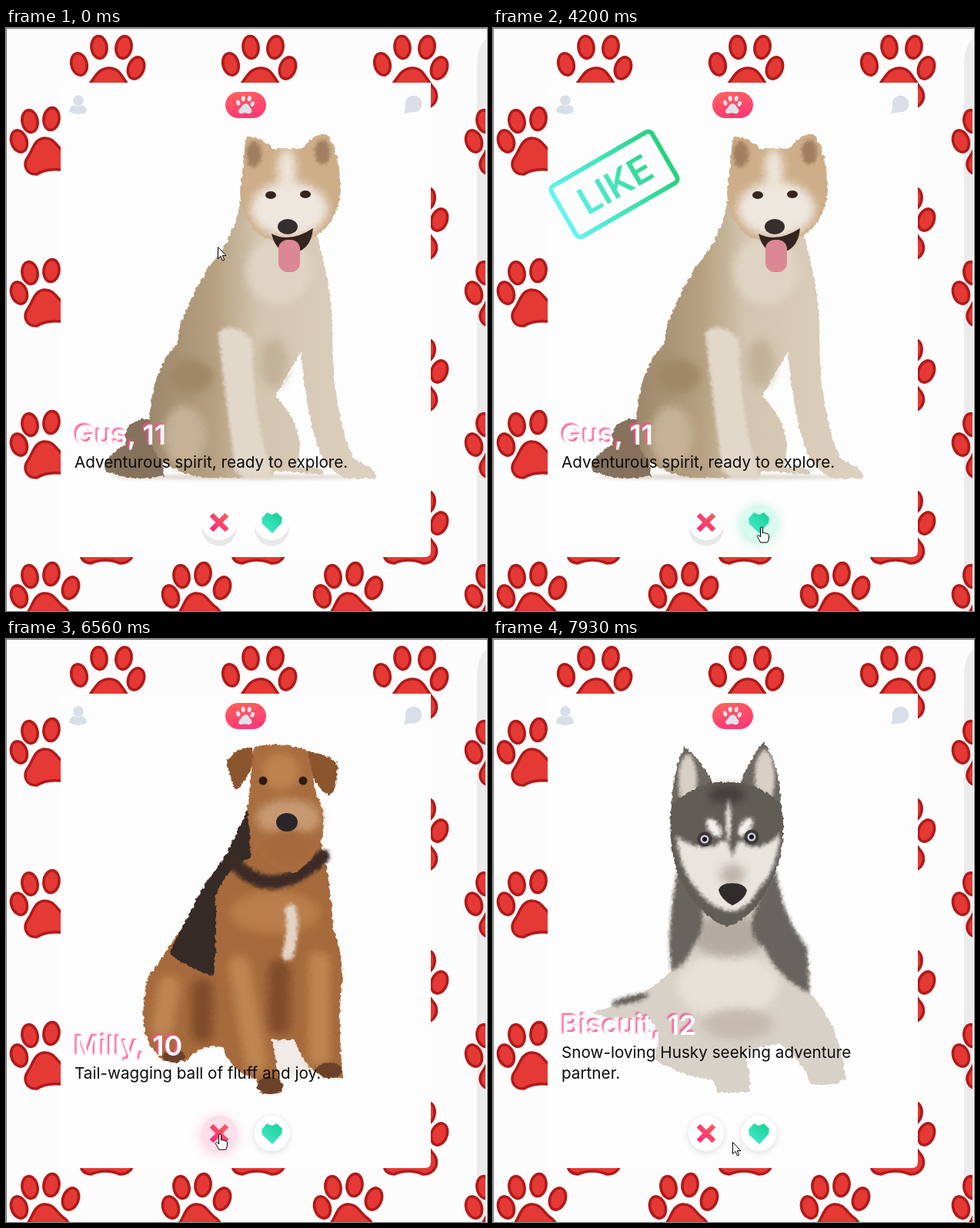
An HTML page that plays this animation: 625x757 px, repeating every 8000 ms.

```html
<!DOCTYPE html>
<html lang="en">
<head>
<meta charset="utf-8">
<title>Dog match</title>
<style>
html, body { margin: 0; width: 100%; height: 100%; overflow: hidden; background: #fcfcfc; }
svg { display: block; width: 625px; height: 757px; font-family: Inter, "Open Sans", sans-serif; }
.name { font-size: 36px; font-weight: 600; fill: #fff; filter: drop-shadow(-1.5px -1.5px 1px #fd4f8b); }
.bio { font-size: 20.7px; fill: #0c0c0c; }
.stamp { font-size: 48px; font-weight: 600; text-anchor: middle; }
.stamp rect { fill: none; stroke-width: 6px; }
.fur { filter: url(#fur); }
.soft { filter: blur(6px); }
.faint { filter: blur(2px); }
.limb { fill: none; stroke-linecap: round; }
.crescent { fill: #e8e8e8; }

/* Everything shares one clock; most cues are hard cuts */
.cue { animation: 8s step-end infinite; }
#first { animation-name: first; }
#second { animation-name: second; }
#third { animation-name: third; }
#like { animation-name: like; }
#nope { animation-name: nope; }
#hand { animation-name: hand; }
#arrow { animation-name: arrow; }
#yes .disc { animation-name: yes; }
#no .disc { animation-name: no; }
#yes .crescent { animation-name: yesRest; }
#no .crescent { animation-name: noRest; }
#cursor { animation: glide 8s infinite; }

@keyframes first { 0% { opacity: 1 } 57.1%, to { opacity: 0 } }
@keyframes second { 0%, 94.1%, to { opacity: 0 } 57.1% { opacity: 1 } }
@keyframes third { 0% { opacity: 0 } 94.1%, to { opacity: 1 } }
@keyframes like { 0%, 57.1%, to { opacity: 0 } 43.2% { opacity: 1 } }
@keyframes nope { 0%, 94.1%, to { opacity: 0 } 86.9% { opacity: 1 } }
@keyframes hand { 0%, 62.3%, 72.1%, 95.6%, to { opacity: 0 } 22.6%, 66.8%, 79% { opacity: 1 } }
@keyframes arrow { 0%, 62.3%, 72.1%, 95.6%, to { opacity: 1 } 22.6%, 66.8%, 79% { opacity: 0 } }
@keyframes yesRest { 0% { opacity: 1 } 22.6%, to { opacity: 0 } }
@keyframes noRest { 0% { opacity: 1 } 66.8%, to { opacity: 0 } }
@keyframes yes {
  0% { fill: #fdfdfd; filter: none }
  22.6% { fill: #d9faee; filter: drop-shadow(0 3px 8px #4be0b577) }
  62.3%, to { fill: #fff; filter: drop-shadow(0 2px 4px #0002) }
}
@keyframes no {
  0% { fill: #fdfdfd; filter: none }
  66.8%, 79% { fill: #fcdfe8; filter: drop-shadow(0 3px 8px #fd5c9255) }
  72.1%, 95.6%, to { fill: #fff; filter: drop-shadow(0 2px 4px #0002) }
}
@keyframes glide {
  0% { transform: translate(275px, 284px); animation-timing-function: steps(2) }
  3.1% { transform: translate(272px, 284px); animation-timing-function: steps(2) }
  6.3% { transform: translate(605px, 650px); animation-timing-function: steps(2) }
  9.4% { transform: translate(495px, 523px); animation-timing-function: steps(5) }
  17.3%, 19.6% { transform: translate(361px, 601px); animation-timing-function: steps(5) }
  27.1%, 49.4% { transform: translate(349px, 636px); animation-timing-function: steps(2) }
  52.4%, 55.2% { transform: translate(349px, 648px); animation-timing-function: steps(2) }
  58.9%, 60.8% { transform: translate(340px, 643px); animation-timing-function: steps(3) }
  65.3% { transform: translate(300px, 652px); animation-timing-function: steps(3) }
  70.2% { transform: translate(292px, 648px); animation-timing-function: steps(1) }
  72.1%, 77.4% { transform: translate(252px, 640px); animation-timing-function: steps(3) }
  81.9%, 87.3% { transform: translate(278px, 643px); animation-timing-function: steps(3) }
  92.2% { transform: translate(278px, 651px); animation-timing-function: steps(2) }
  95.6% { transform: translate(290px, 665px); animation-timing-function: steps(2) }
  99.1%, to { transform: translate(311px, 653px) }
}
</style>
</head>
<body>
<svg viewBox="0 0 625 757">
  <defs>
    <linearGradient id="pink" x1="0" y1="1" x2="1" y2="0"><stop stop-color="#fd297b"/><stop offset="1" stop-color="#f75c5c"/></linearGradient>
    <linearGradient id="pill" x2="0.3" y2="1"><stop stop-color="#ff655b"/><stop offset="1" stop-color="#fd3a74"/></linearGradient>
    <linearGradient id="mint" x1="0" y1="1" x2="1" y2="0"><stop stop-color="#4bebd0"/><stop offset="1" stop-color="#16cf92"/></linearGradient>
    <linearGradient id="likeInk" gradientUnits="userSpaceOnUse" x1="-78" x2="78"><stop stop-color="#64f4f1"/><stop offset="1" stop-color="#24d07c"/></linearGradient>
    <linearGradient id="nopeInk" gradientUnits="userSpaceOnUse" x1="-78" x2="78"><stop stop-color="#fd297b"/><stop offset="1" stop-color="#ff655b"/></linearGradient>
    <linearGradient id="cream"><stop stop-color="#9d886b"/><stop offset=".3" stop-color="#b8a283"/><stop offset=".48" stop-color="#d3c5af"/><stop offset="1" stop-color="#ddd1c0"/></linearGradient>
    <filter id="fur" x="-5%" y="-5%" width="110%" height="110%">
      <feTurbulence type="fractalNoise" baseFrequency=".2" numOctaves="2" seed="4"/>
      <feDisplacementMap in="SourceGraphic" scale="5" xChannelSelector="R" yChannelSelector="G"/>
    </filter>
    <ellipse id="toe" rx="10" ry="14.500"/>
    <g id="paw">
      <use href="#toe" transform="translate(95 47) rotate(-14)"/>
      <use href="#toe" transform="translate(121 25) rotate(-6)"/>
      <use href="#toe" transform="translate(153 25) rotate(10)"/>
      <use href="#toe" transform="translate(169 52) rotate(20)"/>
      <path d="M133 52C148 51 151 65 160 76C172 88 163 105 148 104Q129 96 110 104C93 102 95 86 104 78C114 69 117 53 133 52Z"/>
    </g>
    <g id="tiltedPaw">
      <use href="#toe" transform="translate(17 147) rotate(-18)"/>
      <use href="#toe" transform="translate(31 121) rotate(-10)"/>
      <use href="#toe" transform="translate(59 118) rotate(7)"/>
      <use href="#toe" transform="translate(84 136) rotate(20)"/>
      <path d="M49 143C61 142 65 152 73 159C87 168 86 183 71 184Q52 182 40 190C25 190 22 177 28 168C35 159 36 145 49 143Z"/>
    </g>
    <pattern id="paws" width="197" height="197" patternUnits="userSpaceOnUse">
      <g fill="#e53935" stroke="#b11a1a" stroke-width="3.600"><use href="#paw"/><use href="#tiltedPaw"/></g>
    </pattern>
  </defs>

  <rect width="625" height="757" fill="#fcfcfc"/>
  <path d="M624 14Q612 24 612 48V757H624Z" fill="#ebebeb"/>
  <rect width="623" height="757" fill="url(#paws)"/>
  <path d="M0 .5H625M.5 0V757" stroke="#777" fill="none"/>
  <path d="M71 71H552V679Q552 687 544 687H71Z" fill="#fdfdfd"/>

  <g fill="#d9dfe8">
    <circle cx="94" cy="94" r="6.800"/>
    <path d="M82 109Q82 101 90 100Q94 103 98 100Q105 101 105 109Q100 112 94 112T82 109Z"/>
    <circle cx="529.500" cy="98.500" r="10.800"/>
    <path d="M520 101L517 111L530 109Z"/>
  </g>
  <rect x="285" y="83" width="53" height="34" rx="17" fill="url(#pill)"/>
  <use href="#paw" transform="translate(278 85.300) scale(.25)" fill="#dfe3ec"/>

  <!-- cream dog -->
  <g id="first" class="cue">
    <ellipse cx="300" cy="583" rx="165" ry="3" fill="#d9d2c8" class="faint"/>
    <g class="fur">
      <path fill="#85715b" d="M200 508Q150 503 155 540Q120 565 130 575Q160 590 205 582Z"/>
      <path fill="url(#cream)" d="M306 215Q300 270 262 312Q225 375 222 410Q185 450 187 520Q185 575 262 584H345L350 575L412 580L410 572L378 570Q392 520 350 478L383 420Q395 545 420 570L440 585H480Q483 572 452 560Q425 500 424 400Q425 340 402 262Z"/>
      <ellipse class="soft" fill="#a08767" cx="240" cy="452" rx="30" ry="22"/>
      <ellipse class="soft" fill="#c4b196" cx="232" cy="530" rx="28" ry="40"/>
      <ellipse class="soft" fill="#c3b299" cx="348" cy="435" rx="18" ry="32"/>
      <ellipse class="soft" fill="#dfd4c3" cx="355" cy="315" rx="42" ry="45"/>
      <path class="faint" fill="#e2d8ca" d="M276 395Q285 480 298 575L310 585H348Q322 520 320 405Q295 378 276 395Z"/>
      <path fill="#cdae89" d="M304 214L312 141Q330 140 347 157H384Q400 138 415 137Q432 150 435 212Q430 255 400 272Q365 285 335 272Q306 255 304 214Z"/>
      <ellipse class="soft" fill="#eee7df" cx="368" cy="235" rx="50" ry="36"/>
      <ellipse class="soft" fill="#eee5da" cx="365" cy="184" rx="12" ry="28"/>
      <g class="faint" fill="#967355" opacity=".8">
        <ellipse cx="322" cy="164" rx="10" ry="17"/>
        <ellipse cx="411" cy="161" rx="10" ry="16"/>
      </g>
    </g>
    <path fill="#33241f" d="M345 267Q368 280 399 260Q396 292 368 292Q350 290 345 267Z"/>
    <rect x="354" y="275" width="28" height="42" rx="12" fill="#dc8794"/>
    <ellipse cx="366" cy="258" rx="13" ry="10" fill="#342e2c"/>
    <g fill="#35261d"><ellipse cx="344" cy="217" rx="7" ry="5"/><ellipse cx="389" cy="216" rx="7" ry="5"/></g>
    <text class="name" x="89" y="541">Gus, 11</text>
    <text class="bio" x="89" y="571">Adventurous spirit, ready to explore.</text>
  </g>

  <!-- tan and black dog -->
  <g id="second" class="cue">
    <ellipse cx="362" cy="540" rx="55" ry="30" fill="#f1ebe7" class="soft"/>
    <g class="fur">
      <path fill="#a66a3c" d="M314 215Q295 285 262 318Q225 385 185 438Q165 520 206 548H235Q250 525 282 530Q290 560 325 572L330 590H358Q352 550 345 520H375Q385 555 415 570H438Q430 500 437 440Q436 400 425 375Q422 310 408 260Z"/>
      <path fill="#352a28" d="M314 220Q285 290 258 318L212 408Q240 430 270 437Q275 370 272 335Q290 290 318 285Z"/>
      <ellipse class="soft" fill="#b97e4b" cx="350" cy="355" rx="58" ry="28"/>
      <g class="limb soft">
        <path stroke="#7f4c2b" stroke-width="28" d="M255 455V510M355 430V500"/>
        <path stroke="#bd8652" stroke-width="28" d="M303 425L325 550M407 420V540M212 450L203 505"/>
      </g>
      <path class="limb faint" stroke="#3c2c26" stroke-width="18" d="M296 290Q345 345 412 282"/>
      <path class="limb faint" stroke="#e4d3c5" stroke-width="15" d="M370 352Q375 380 366 410"/>
      <path fill="#8b552f" d="M320 141Q300 140 287 158Q292 190 300 196Q315 180 322 160Z"/>
      <path fill="#8b552f" d="M387 146Q410 146 430 160Q432 195 420 204Q400 190 394 165Z"/>
      <path fill="#a96d3f" d="M322 140Q355 132 392 145L404 205Q418 225 410 262Q395 295 372 304Q335 300 318 262Q312 220 318 180Z"/>
      <ellipse class="soft" fill="#c79a72" cx="367" cy="232" rx="42" ry="24"/>
      <ellipse class="soft" fill="#a4693c" cx="366" cy="268" rx="28" ry="22"/>
      <ellipse class="soft" fill="#bd8350" cx="357" cy="172" rx="24" ry="24"/>
      <g fill="#6b4229"><ellipse cx="218" cy="542" rx="14" ry="8"/><ellipse cx="343" cy="580" rx="17" ry="11"/><ellipse cx="420" cy="560" rx="17" ry="10"/></g>
    </g>
    <ellipse cx="365" cy="238" rx="14" ry="12" fill="#28262a"/>
    <g fill="#2e1c14"><circle cx="334" cy="184" r="5.500"/><circle cx="386" cy="184" r="5.500"/></g>
    <text class="name" x="89" y="541">Milly, 10</text>
    <text class="bio" x="89" y="571">Tail-wagging ball of fluff and joy.</text>
  </g>

  <!-- grey and white dog -->
  <g id="third" class="cue">
    <g class="fur">
      <path fill="#d8d1c7" d="M238 310Q225 380 232 430Q200 465 130 485Q150 497 200 490Q225 515 208 545Q250 570 286 572L292 589H333Q336 560 325 535L372 525Q405 550 412 578Q445 582 459 570Q450 500 411 458Q418 410 388 385Q375 350 368 310Z"/>
      <ellipse class="faint" fill="#67605a" cx="178" cy="468" rx="26" ry="5" transform="rotate(-14 178 468)"/>
      <ellipse class="soft" fill="#e7e1d8" cx="305" cy="450" rx="66" ry="42"/>
      <ellipse class="soft" fill="#c4bbae" cx="318" cy="500" rx="46" ry="20"/>
      <ellipse class="soft" fill="#b3aba1" cx="306" cy="385" rx="48" ry="28"/>
      <g class="faint" fill="#69635e">
        <path d="M240 300Q225 380 232 430Q250 425 262 395Q282 370 265 330Z"/>
        <path d="M368 300Q375 360 408 400L411 460Q370 440 352 400Q325 385 345 340Z"/>
      </g>
      <g fill="#6e6762">
        <path d="M232 222Q232 170 249 140Q272 158 288 192L270 222Z"/>
        <path d="M320 190Q335 152 352 134Q374 165 374 218L345 225Z"/>
      </g>
      <g class="faint" fill="#d8cfc6">
        <ellipse cx="253" cy="184" rx="12" ry="34"/>
        <ellipse cx="353" cy="180" rx="13" ry="36"/>
      </g>
      <path fill="#625c57" d="M232 215Q262 190 288 186H322Q355 195 375 215Q382 260 368 300Q345 360 305 374Q265 360 240 305Q226 260 232 215Z"/>
      <path class="faint" fill="#e9e4de" d="M238 255Q262 275 290 268Q306 250 311 285Q318 250 330 268Q352 275 373 252Q370 300 345 325Q330 352 311 354Q285 352 265 325Q242 300 238 255Z"/>
      <g class="faint" fill="#f5f2ee">
        <ellipse cx="287" cy="245" rx="7" ry="14" transform="rotate(-35 287 245)"/>
        <ellipse cx="328" cy="244" rx="7" ry="14" transform="rotate(35 328 244)"/>
        <ellipse cx="306" cy="235" rx="3" ry="30"/>
      </g>
      <ellipse class="soft" fill="#37322f" opacity=".7" cx="304" cy="202" rx="24" ry="12"/>
      <ellipse class="soft" fill="#bfb6ac" cx="311" cy="306" rx="16" ry="14"/>
    </g>
    <g fill="#c9ccdb" stroke="#3d3735" stroke-width="4"><circle cx="275" cy="260" r="7.500"/><circle cx="336" cy="257" r="7.500"/></g>
    <g fill="#171515"><circle cx="275" cy="260" r="3"/><circle cx="336" cy="257" r="3"/></g>
    <path fill="#302c2b" d="M293 326Q296 317 311 317T330 326Q328 338 311 346Q296 338 293 326Z"/>
    <text class="name" x="89" y="514">Biscuit, 12</text>
    <text class="bio" x="89" y="544">Snow-loving Husky seeking adventure</text>
    <text class="bio" x="89" y="571">partner.</text>
  </g>

  <g transform="translate(157.500 203) rotate(-30)">
    <g id="like" class="cue stamp" fill="url(#likeInk)" stroke="none">
      <rect x="-75.500" y="-38" width="151" height="76" rx="6" style="stroke: url(#likeInk)"/>
      <text x="1" y="18">LIKE</text>
    </g>
    <g id="nope" class="cue stamp" fill="url(#nopeInk)">
      <rect x="-75.500" y="-38" width="151" height="76" rx="6" style="stroke: url(#nopeInk)"/>
      <text y="18">NOPE</text>
    </g>
  </g>

  <g id="no" transform="translate(277 642)">
    <circle class="cue crescent" cy="8" r="22.500"/>
    <circle class="cue disc" r="23"/>
    <path d="M-10-10L10 10M10-10L-10 10" stroke="url(#pink)" stroke-width="6.500"/>
  </g>
  <g id="yes" transform="translate(345.500 642)">
    <circle class="cue crescent" cy="8" r="22.500"/>
    <circle class="cue disc" r="23"/>
    <path d="M-13.500-5L-6.500-13L0-10L6.500-13L13.500-6L12.500 1L.5 14L-12.500 2Z" fill="url(#mint)"/>
  </g>

  <g id="cursor" fill="#fff" stroke="#000" stroke-linejoin="round">
    <path id="arrow" class="cue" d="M.5.5V15.500L4 12.300L6.500 18L8.700 17L6.300 11.500H11Z"/>
    <path id="hand" class="cue" d="M-1.500 1.500a1.500 1.500 0 0 1 3 0V8l1-.6a1.400 1.400 0 0 1 2 .9l.6-.2a1.400 1.400 0 0 1 2 1l.5-.1a1.400 1.400 0 0 1 1.900 1.400V14q0 3-2 6H-1.500q-1-3-4.200-7.500a1.500 1.500 0 0 1 2.400-1.600l1.800 2Z"/>
  </g>
</svg>
</body>
</html>
```
